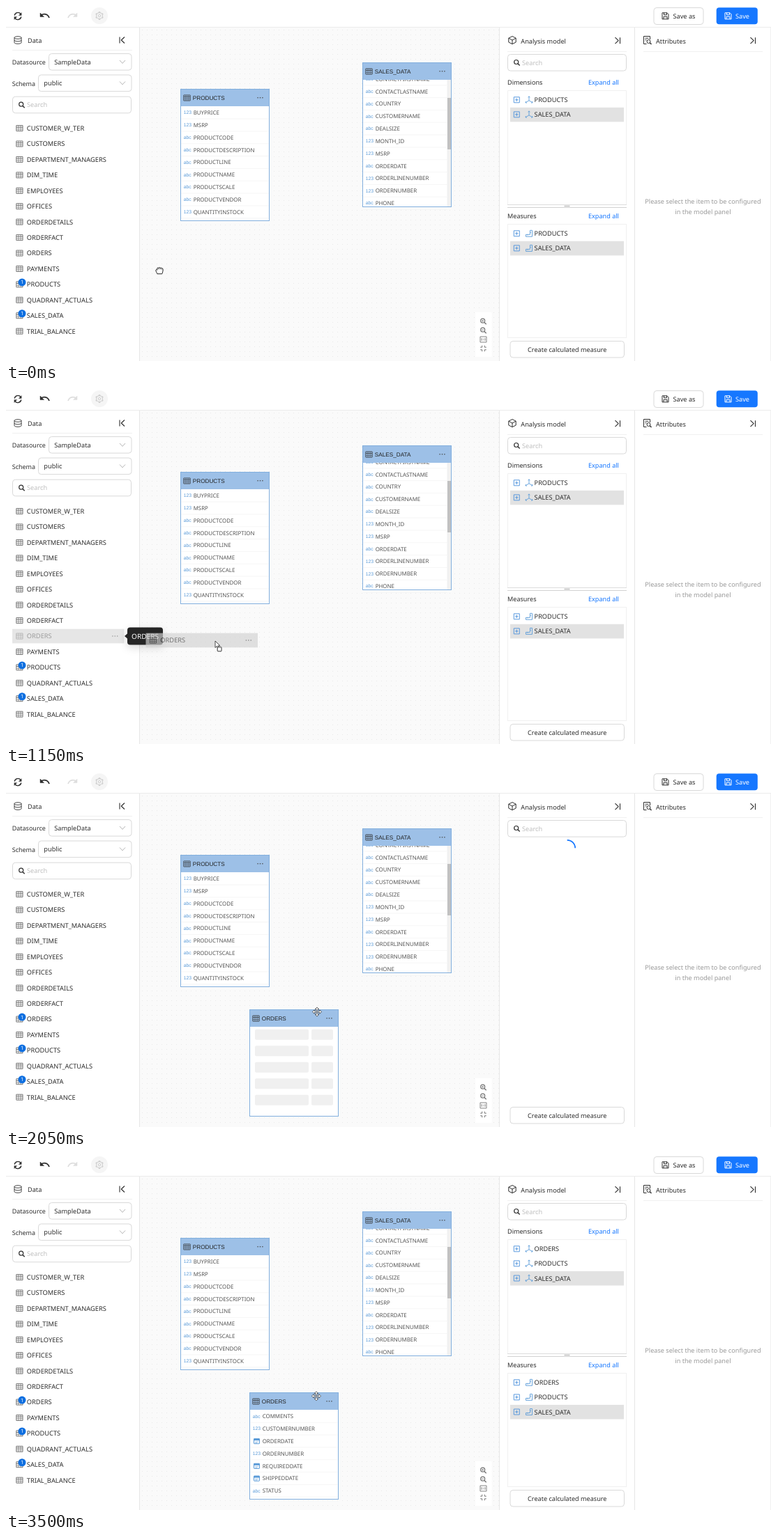
An HTML page for the animation above (3750 ms loop, 1097 by 510 pixels).

```html
<!DOCTYPE html>
<html lang="en">
<head>
<meta charset="utf-8">
<title>Model editor</title>
<style>
html, body { margin: 0; width: 100%; height: 100%; overflow: hidden; background: #fff; }
svg { display: block; width: 100vw; height: 100vh; font: 9.2px "Noto Sans", "Open Sans", sans-serif; }
text { white-space: pre; text-rendering: geometricPrecision; }
</style>
</head>
<body>
<svg id="stage" viewBox="0 0 1097 510" xmlns="http://www.w3.org/2000/svg"></svg>
<script>
const BLUE = '#1677ff', INK = '#2e2e2e', EDGE = '#d9d9d9', PALE = '#f0f0f0', SOFT = '#5b9bd8';
const LOOP = 3750, STEP = 50;

// Drawing helpers
const rect = (x, y, w, h, fill, stroke = 'none', r = 0) =>
  `<rect x="${x}" y="${y}" width="${w}" height="${h}" rx="${r}" fill="${fill}" stroke="${stroke}"/>`;
const path = (d, stroke = INK, w = 1, fill = 'none') =>
  `<path d="${d}" stroke="${stroke}" stroke-width="${w}" fill="${fill}" stroke-linejoin="round"/>`;
const circle = (x, y, r, fill, stroke = 'none', w = 1) =>
  `<circle cx="${x}" cy="${y}" r="${r}" fill="${fill}" stroke="${stroke}" stroke-width="${w}"/>`;
const text = (x, y, s, fill = INK, size = 9.2, more = '') =>
  `<text x="${x}" y="${y + size * 0.36}" fill="${fill}" font-size="${size}" ${more}>${s}</text>`;
const at = (x, y, s) => `<g transform="translate(${x} ${y})">${s}</g>`;
const group = (id, s) => `<g id="${id}">${s}</g>`;
const dots = (x, y) => [-3.4, 0, 3.4].map(d => circle(x + d, y, 0.8, '#444')).join('');
const SANS = 'font-family="Liberation Sans, Arial, sans-serif"';
const MID = 'text-anchor="middle"';

// Icons, centred on 0,0
const tableIcon = (c = '#555') =>
  path('M-4.6-4h9.2v8h-9.2zM-4.6-1.4h9.2', c, 0.8) + path('M-4.6 1.4h9.2M-1.5-4v8M1.6-4v8', c, 0.55);
const lens = c => circle(-0.8, -0.8, 3, 'none', c, 1.2) + path('M1.4 1.4L4.2 4.2', c, 1.4);
const chevron = path('M-4-2L0 2.4L4-2', '#b5b5b5', 1);
const collapse = path('M-3.5-4.5v9M3.5-4.5L-1.2 0L3.5 4.5', INK, 1.1);
const collapseRight = `<g transform="scale(-1 1)">${collapse}</g>`;
const disk = c => path('M-4.5-4.5h7l2 2v7h-9zM-2-4.5v3h4v-3M-2.5 4.5v-3.5h5v3.5', c, 1);
const undo = c => path('M-5.5-1C-2-3.5 4-3 6 3', c, 1.7) + path('M-7-4v5.5h5.5z', c, 0.5, c);
const plusBox = path('M-4-4h8v8h-8zM-2.2 0h4.4M0-2.2v4.4', '#4a90dc', 0.9);
const axes = path('M0-5V1L-5 4M0 1L5 4M-1.5-3.5L0-5l1.5 1.5M-3.4 4.6L-5 4l.4-1.8M3.4 4.6L5 4l-.4-1.8', SOFT, 0.9);
const ruler = path('M-4.5 4.5V1.5H1.5V-4.5H4.5V4.5ZM-2 1.5v1.4M1.5-1.5h1.4', SOFT, 0.9);
const calendar = rect(-4, -3.5, 8, 7.2, '#fff', SOFT, 0.5) + rect(-4, -3.5, 8, 2.6, SOFT) +
  path('M-2.3 1h1.2M-.6 1h1.2M1.2 1h1.2M-2.3 2.5h1.2M-.6 2.5h1.2', SOFT, 0.8);
const gear = circle(0, 0, 4.4, 'none', '#cfcfcf', 1.1) + circle(0, 0, 1.7, 'none', '#cfcfcf', 1) +
  [0, 60, 120, 180, 240, 300].map(a => `<path d="M-1.2-5.3h2.4" stroke="#cfcfcf" stroke-width="1.3" transform="rotate(${a})"/>`).join('');

const search = (x, y) => rect(x + .5, y + .5, 170, 23.6, '#fff', EDGE, 4) +
  at(x + 13.5, y + 12.3, lens(INK)) + text(x + 21, y + 12.3, 'Search', '#bfbfbf');
const select = (x, y, s) => rect(x + .5, y + .5, 179.5 - x, 23.6, '#fff', EDGE, 4) +
  text(x + 8.3, y + 12.3, s) + at(167, y + 12, chevron);

function toolbar() {
  return rect(0, 0, 1097, 30, '#fff') + path('M0 30.5H1097', '#ececec') +
    at(17, 14.5, path('M-4.8-1A5 5 0 0 1 4-3.2M4.8 1A5 5 0 0 1-4 3.2', INK, 1.4) +
      path('M5.2-5v4h-4zM-5.2 5v-4h4z', INK, 0.3, INK)) +
    at(56, 14, undo(INK)) + at(95, 14, `<g transform="scale(-1 1)">${undo('#dedede')}</g>`) +
    circle(134, 14, 12, '#f5f5f5') + at(134, 14, gear) +
    rect(929, 2.5, 71, 24, '#fff', EDGE, 4) + at(945.5, 14.3, disk(INK)) + text(956.5, 14.4, 'Save as') +
    rect(1018.7, 2.3, 59.1, 24, BLUE, 'none', 4) + at(1035.5, 14.3, disk('#fff')) + text(1046, 14.4, 'Save', '#fff');
}

const TABLES = ['CUSTOMER_W_TER', 'CUSTOMERS', 'DEPARTMENT_MANAGERS', 'DIM_TIME', 'EMPLOYEES', 'OFFICES', 'ORDERDETAILS',
  'ORDERFACT', 'ORDERS', 'PAYMENTS', 'PRODUCTS', 'QUADRANT_ACTUALS', 'SALES_DATA', 'TRIAL_BALANCE'];
const ORDERS = TABLES.indexOf('ORDERS');
const rowY = i => 175.6 + 22.43 * i;
const badge = i => circle(23, rowY(i) - 3, 5.5, '#0f6fe0') + text(23, rowY(i) - 3.1, '1', '#fff', 7.4, MID);
const entry = name => at(10.4, 0, tableIcon()) + text(20.8, 0, name, INK, 9.3);
const bar = rect(0, -10.3, 160.5, 20.6, '#d2d2d2') + dots(147.3, 0);

function dataPanel() {
  return rect(0, 31, 191, 479, '#fff') + path('M191.5 31V510', '#e6e6e6') +
    at(17, 49, path('M-5-3.5v7c0 2.4 10 2.4 10 0v-7c0-2.4-10-2.4-10 0c0 2.4 10 2.4 10 0M-5 0c0 2.4 10 2.4 10 0', INK, 0.9)) +
    text(31, 49.7, 'Data') + at(166.5, 49, collapse) + path('M9 63.5H181', PALE) +
    text(8.7, 81, 'Datasource', INK, 9) + select(61, 68, 'SampleData') +
    text(8.7, 111.4, 'Schema', INK, 9) + select(46, 98.5, 'public') + search(9, 129.7) +
    group('hover', bar) +
    TABLES.map((n, i) => i === ORDERS ? '' : at(9, rowY(i), entry(n))).join('') +
    group('ordersRow', at(9, rowY(ORDERS), entry('ORDERS'))) +
    badge(10) + badge(12) + group('ordersBadge', badge(ORDERS));
}

// Table cards on the canvas
function cardFrame(x, y, h, name, rows) {
  return rect(x, y, 127, h, '#fff') + rows + rect(x, y, 127, 25, '#9dc0e7') +
    rect(x, y + .5, 127, h - 1, 'none', '#82afde') +
    at(x + 9, y + 13, tableIcon('#333')) + text(x + 17.3, y + 13.2, name, '#222', 8.2, SANS) + dots(x + 114, y + 12.8);
}
function fields(x, y, list, width = 126) {
  return list.split(' ').map((f, i) => {
    const cy = y + 17.83 * i, name = f.slice(1);
    const kind = f[0] === 'd' ? at(x + 10, cy, calendar)
      : text(x + 4.3, cy - .2, f[0] === 'n' ? '123' : 'abc', SOFT, 6.8, SANS);
    return kind + text(x + 18.2, cy, name, '#555', 7.9) + path(`M${x + 1} ${cy + 8.9}h${width - 1}`, '#f4f4f4', .8);
  }).join('');
}
const PRODUCT_FIELDS = 'nBUYPRICE nMSRP aPRODUCTCODE aPRODUCTDESCRIPTION aPRODUCTLINE aPRODUCTNAME aPRODUCTSCALE aPRODUCTVENDOR nQUANTITYINSTOCK';
const SALES_FIELDS = 'aCONTACTFIRSTNAME aCONTACTLASTNAME aCOUNTRY aCUSTOMERNAME aDEALSIZE nMONTH_ID nMSRP aORDERDATE nORDERLINENUMBER nORDERNUMBER aPHONE';
const ORDER_FIELDS = 'aCOMMENTS nCUSTOMERNUMBER dORDERDATE nORDERNUMBER dREQUIREDDATE dSHIPPEDDATE aSTATUS';

function canvas() {
  const skeleton = [0, 1, 2, 3, 4].map(i => {
    const y = 369.7 + 23.5 * i;
    return rect(357, y, 77, 15, '#f0f0f0', 'none', 2) + rect(438, y, 31, 15, '#f0f0f0', 'none', 2);
  }).join('');
  const tools = rect(673, 440, 23.5, 64, '#fff') +
    at(684.5, 453, lens('#777') + path('M-2.3-.8h3M-.8-2.3v3', '#777', .8)) +
    at(684.5, 466, lens('#777') + path('M-2.3-.8h3', '#777', .8)) +
    at(684.5, 479, path('M-4.5-4h9v8h-9zM-2.4-1.8v3.6M2.4-1.8v3.6M0-1v.8M0 .6v.8', '#777', .9)) +
    at(684.5, 492, path('M-4.3-1.8h2.5v-2.5M4.3-1.8h-2.5v-2.5M-4.3 1.8h2.5v2.5M4.3 1.8h-2.5v2.5', '#777', 1));
  return '<defs><pattern id="grid" x="192" y="31" width="7" height="7" patternUnits="userSpaceOnUse">' +
    rect(3, 3, 1, 1, '#e9e9e9') + '</pattern></defs>' +
    rect(192, 31, 516, 479, '#fafafa') + rect(192, 31, 516, 479, 'url(#grid)') +
    group('tools', tools) +
    cardFrame(250.5, 119, 190, 'PRODUCTS', fields(250.5, 153.2, PRODUCT_FIELDS)) +
    cardFrame(511.5, 81, 208, 'SALES_DATA', fields(511.5, 104.9, SALES_FIELDS, 121) +
      rect(632.5, 106, 5.5, 182, '#f1f1f1') + rect(633, 132, 5, 74, '#c1c1c1')) +
    group('ordersCard', cardFrame(349.5, 341, 154, 'ORDERS',
      group('skeleton', skeleton) + group('orderFields', fields(349.5, 375.4, ORDER_FIELDS))));
}

function tree(top, names, icon) {
  return names.map((n, i) => {
    const y = top + 21.1 * i;
    return (n === 'SALES_DATA' ? rect(723, y - 10.3, 163, 20.6, '#e2e2e2') : '') +
      at(732.3, y - .2, plusBox) + at(750, y - .2, icon) + text(757.6, y, n, INK, 9.2);
  }).join('');
}
const trees = names => tree(135, names, axes) + tree(327, names, ruler);

function modelPanel() {
  return rect(708, 31, 193, 479, '#fff') + path('M707.5 31V510M901.5 31V510', '#e6e6e6') +
    at(726, 49, path('M0-5.5L5.2-2.8V3L0 5.7L-5.2 3V-2.8ZM-5.2-2.8L0 0L5.2-2.8M0 0v5.7', INK, 1)) +
    text(738.3, 50.2, 'Analysis model') + at(877, 49.7, collapseRight) + path('M719 65.5H890', PALE) + search(719, 69) +
    group('lists',
      text(719, 109.7, 'Dimensions', INK, 9.1) + text(835, 109.4, 'Expand all', BLUE, 9.1) +
      path('M719.5 286V121.5H889.5V286', PALE) + path('M719 285.5H890', '#dcdcdc') + path('M719 289.5H890', '#d2d2d2') +
      path('M800.5 287.5h8', '#bbb', 1.4) +
      text(719, 302, 'Measures', INK, 9.1) + text(835, 301.6, 'Expand all', BLUE, 9.1) +
      rect(719.5, 313.5, 170, 163, 'none', PALE) +
      group('treeBefore', trees(['PRODUCTS', 'SALES_DATA'])) +
      group('treeAfter', trees(['ORDERS', 'PRODUCTS', 'SALES_DATA']))) +
    group('spinner', path('M0-11.5A11.5 11.5 0 0 1 11.5 0', BLUE, 1.7)) +
    rect(723, 481.5, 163.5, 23.5, '#fff', EDGE, 4) + text(804.8, 493.5, 'Create calculated measure', INK, 9.1, MID);
}

function attributesPanel() {
  return rect(902, 31, 195, 479, '#fff') + path('M1096.5 31V510', PALE) +
    at(919.5, 49, path('M4-1V-5.5H-5V5.5H-1M-3-2.8h5M-3-.3h2', INK, 1) + circle(2, 2, 2.5, '#fff', INK, 1) + path('M3.8 3.8L6 6', INK, 1.4)) +
    text(932, 50.2, 'Attributes') + at(1071, 49.7, collapseRight) + path('M914 65.5H1085', PALE) +
    text(999.4, 280.3, 'Please select the item to be configured', '#999', 9.15, MID) +
    text(999.4, 295.5, 'in the model panel', '#999', 9.15, MID);
}

function overlays() {
  const arms = [0, 90, 180, 270].map(a =>
    `<path d="M-1-1.6V-3.8H-2.7L0-6.6L2.7-3.8H1V-1.6" fill="#fff" stroke="#333" stroke-width=".75" transform="rotate(${a})"/>`).join('');
  const hand = path('M-3.2 4.8C-3.4 3-5.5 1.2-5.2-.6C-4.9-1.6-3.6-1.2-3.2-.6V-3C-3-4.4-1.4-4.3-1.1-3.3C-.9-4.8 1-4.7 1.2-3.3C1.6-4.4 3.2-4.1 3.3-2.8C3.8-3.5 5.1-3 5.1-1.9C5.2 .8 4.6 2.6 3.8 4.8Z', '#222', 1, '#fff') +
    path('M-1.1-3.2v1.6M1.2-3.2v1.6M3.3-2.8v1.4', '#222', .8);
  const arrow = path('M0 0V9.6L2.3 7.4L3.9 11L5.4 10.3L3.9 6.9H7Z', '#222', .8, '#fff');
  return group('tooltip', '<g style="filter:drop-shadow(0 4px 6px rgba(0,0,0,.15))">' +
      rect(174, 342.5, 51, 25, '#252525', 'none', 4) + path('M174.5 351L170 355L174.5 359Z', 'none', 0, '#252525') + '</g>' +
      text(199.5, 355.2, 'ORDERS', '#fff', 10.1, MID)) +
    group('ghost', bar + entry('ORDERS')) +
    group('cursor', group('hand', hand) + group('move', arms + circle(0, 0, 1.1, '#fff', '#333', .7)) +
      group('arrow', arrow) + group('dragMark', rect(3.2, 8.8, 5.8, 6, '#fff', '#333', .6)));
}

const stage = document.getElementById('stage');
stage.innerHTML = canvas() + dataPanel() + modelPanel() + attributesPanel() + toolbar() + overlays();
const parts = Object.fromEntries([...stage.querySelectorAll('g[id]')].map(g => [g.id, g]));

// Pointer path: time, x, y
const TRACK = [[0, 220, 380], [50, 218, 380], [150, 200, 377], [250, 172, 371], [350, 142, 364], [450, 121, 359], [550, 112, 357],
  [800, 110, 357], [950, 110, 357], [1000, 120, 359], [1050, 166, 364], [1100, 231, 366], [1150, 300, 362], [1200, 360, 355],
  [1250, 405, 349], [1300, 433, 346], [1350, 443, 345], [1400, 446, 345], [1500, 448, 345], [1600, 446, 344.5],
  [2300, 446, 344.5], [2500, 445, 347], [3450, 445, 347], [3500, 445, 346.3], [LOOP, 445, 346.3]];

function pointer(t) {
  const i = TRACK.findIndex((p, k) => k && t <= p[0]);
  const [a, b] = [TRACK[i - 1], TRACK[i]], f = (t - a[0]) / (b[0] - a[0]);
  return [a[1] + (b[1] - a[1]) * f, a[2] + (b[2] - a[2]) * f];
}
const fade = (t, from, to) => Math.max(0, Math.min(1, (t - from) / (to - from)));
const show = (id, o) => parts[id].setAttribute('opacity', +o);
const move = (id, x, y, more = '') => parts[id].setAttribute('transform', `translate(${x} ${y}) ${more}`);

function draw(t) {
  const [x, y] = pointer(t);
  const dragging = t >= 1000 && t < 1800, dropped = t >= 2000;
  const loading = dropped && t < 2250;
  const row = dragging ? ORDERS : Math.round((y - 175.6) / 22.43);
  const onRow = dragging || (t < 1000 && x < 170);

  move('cursor', x, y);
  const kind = dragging ? 'arrow' : t >= 1800 || onRow ? 'move' : x < 192 ? 'arrow' : 'hand';
  for (const id of ['hand', 'move', 'arrow']) show(id, id === kind);
  show('dragMark', dragging);
  show('tools', !dragging);

  move('hover', 9, rowY(row));
  show('hover', onRow ? (dragging ? 0.55 : 1) : 0);
  show('ordersRow', dragging ? 0.4 : 1);
  show('ordersBadge', dropped);
  show('tooltip', fade(t, 550, 700) * (1 - fade(t, 1950, 2050)));
  move('ghost', x - 99.5, y - 1);
  show('ghost', dragging ? 0.66 : 0);

  show('ordersCard', dropped);
  show('skeleton', t < 2300);
  show('orderFields', t >= 2300);
  show('lists', !loading);
  show('treeBefore', !dropped);
  show('treeAfter', dropped);
  show('spinner', loading);
  move('spinner', 804.7, 109.3, `rotate(${(t - 2050) * 0.36})`);
}

const start = performance.now();
function tick() {
  const t = (performance.now() - start) % LOOP;
  draw(Math.floor(t / STEP) * STEP);
  requestAnimationFrame(tick);
}
tick();
</script>
</body>
</html>
```
